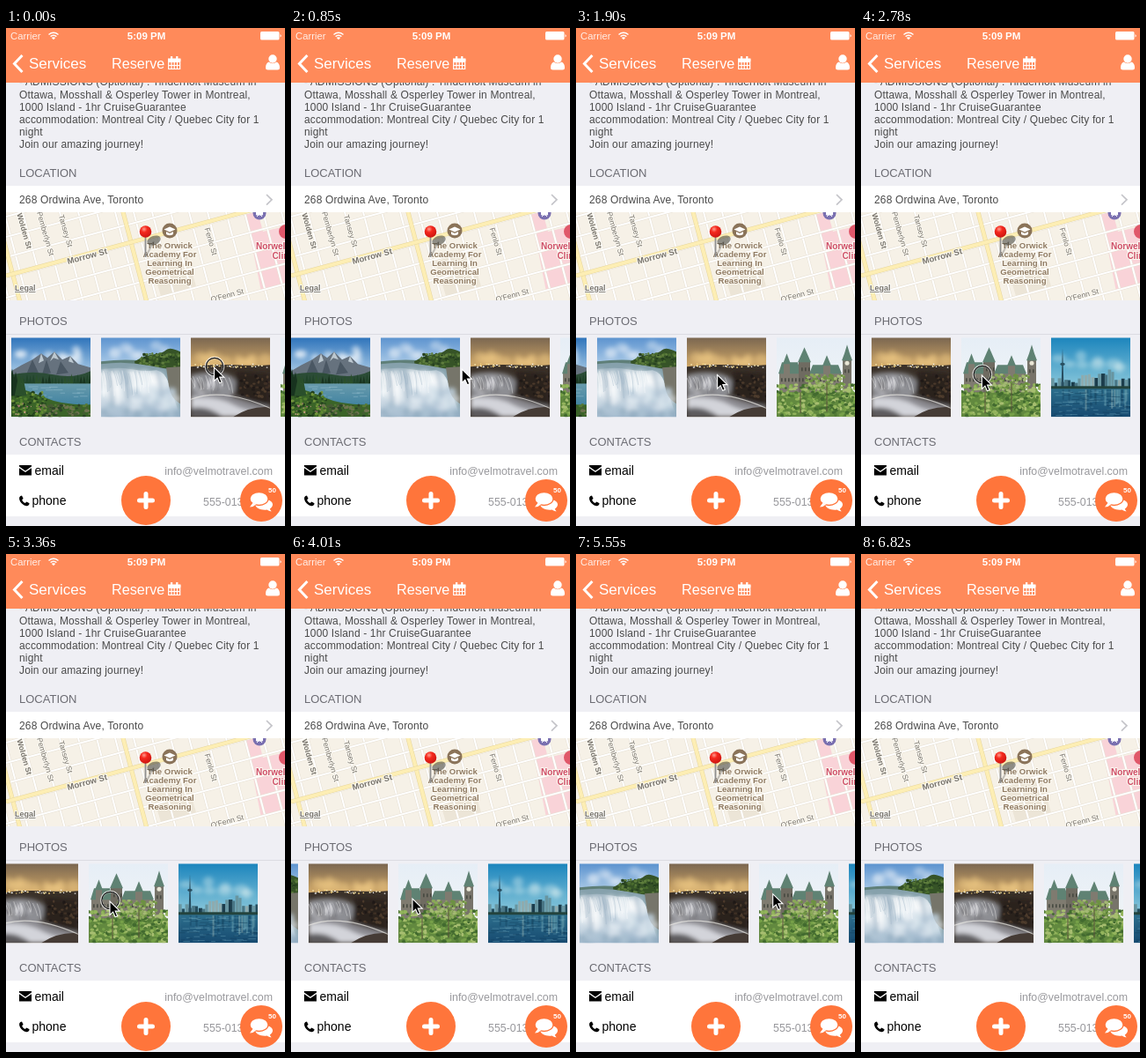
Animation of 317 by 565 pixels, one loop 7100 ms. Source, as an HTML page:

```html
<!DOCTYPE html>
<html lang="en">
<head>
<meta charset="utf-8">
<title>Tour details</title>
<style>
html, body { margin: 0; width: 100%; height: 100%; overflow: hidden; background: #efeff4; }
svg { display: block; width: 100vw; height: 100vh; }
text { font-family: "Liberation Sans", Arial, sans-serif; }
.body { font-size: 12px; letter-spacing: .15px; fill: #4a4a4a; }
.head { font-size: 13px; fill: #6b6b72; }
.side { font-size: 12.4px; fill: #98989c; }
.item { font-size: 14px; fill: #000; }
.map { font-size: 8.6px; fill: #77736c; stroke: #fbf8f0; stroke-width: 2px; paint-order: stroke; }
.nav { fill: #fff; }
</style>
</head>
<body>
<svg viewBox="0 0 317 565" preserveAspectRatio="none">
  <defs>
    <clipPath id="mapClip"><rect y="209" width="317" height="100"/></clipPath>
    <clipPath id="photoClip"><rect width="90" height="90"/></clipPath>
    <filter id="soft" x="-20%" y="-20%" width="140%" height="140%"><feGaussianBlur stdDeviation="2.500"/></filter>
    <radialGradient id="ball" cx=".38" cy=".3" r=".75">
      <stop offset="0" stop-color="#ff9a8c"/><stop offset=".35" stop-color="#f5291d"/><stop offset="1" stop-color="#c81410"/>
    </radialGradient>
    <linearGradient id="sky0" x2="0" y2="1"><stop offset="0" stop-color="#2f74bb"/><stop offset=".5" stop-color="#b5d3ea"/></linearGradient>
    <linearGradient id="sky1" x2="0" y2="1"><stop offset="0" stop-color="#5c93cf"/><stop offset=".4" stop-color="#b9d4ec"/></linearGradient>
    <linearGradient id="sky2" x2="0" y2="1"><stop offset="0" stop-color="#7a6650"/><stop offset=".38" stop-color="#d3aa68"/></linearGradient>
    <linearGradient id="sky3" x2="0" y2="1"><stop offset="0" stop-color="#e6eef6"/><stop offset="1" stop-color="#f4f6f7"/></linearGradient>
    <linearGradient id="sky4" x2="0" y2="1"><stop offset="0" stop-color="#1c85bd"/><stop offset=".65" stop-color="#8fcbdc"/></linearGradient>
    <linearGradient id="lake" x2="0" y2="1"><stop offset="0" stop-color="#6f9fae"/><stop offset="1" stop-color="#3b7f9f"/></linearGradient>
    <linearGradient id="bay" x2="0" y2="1"><stop offset="0" stop-color="#2d6e8c"/><stop offset="1" stop-color="#164a70"/></linearGradient>
    <linearGradient id="fall" x2=".3" y2="1"><stop offset="0" stop-color="#93abb9"/><stop offset=".45" stop-color="#dfe8ee"/><stop offset="1" stop-color="#a3bace"/></linearGradient>
  </defs>

  <rect width="317" height="565" fill="#efeff4"/>

  <g class="body" id="copy"></g>

  <text class="head" x="15" y="169">LOCATION</text>
  <rect y="179" width="317" height="30" fill="#fff"/>
  <text class="body" x="15" y="199">268 Ordwina Ave, Toronto</text>
  <path d="M296 189l6 5.800-6 5.800" fill="none" stroke="#c4c4c9" stroke-width="1.700"/>

  <g clip-path="url(#mapClip)">
    <rect y="209" width="317" height="100" fill="#f6f1e7"/>
    <path d="M272 209h14l6 22 25-6v66l-27 8z" fill="#f9d3d8"/>
    <path d="M164 265l40-12 12 40-40 11z" fill="#ece5d7"/>
    <g id="streets" fill="none"></g>
    <g id="labels" class="map"></g>
    <circle cx="186" cy="230" r="8.500" fill="#8a7359"/>
    <path d="M179.500 228.500l6.500-3 6.500 3-6.500 3zM182 231v3q4 2.500 8 0v-3l-4 2z" fill="#fff"/>
    <circle cx="288" cy="210" r="7.500" fill="#7a70b0"/>
    <path d="M284.500 206h7v6h-7zM285 214l2-2m4 2l-2-2" fill="#fff" stroke="#fff"/>
    <circle cx="318" cy="231" r="8" fill="#e0586a"/>
    <path d="M159 259l9-17" stroke="#444" stroke-opacity=".3" stroke-width="2"/>
    <ellipse cx="168" cy="241" rx="8" ry="5" fill="#4b4b45" opacity=".6" transform="rotate(-22 168 241)"/>
    <path d="M158.500 237v23" stroke="#8f8f8f" stroke-width="1.800"/>
    <circle cx="158.500" cy="231" r="6.800" fill="url(#ball)"/>
    <text x="10" y="298" style="font-size:9px;font-weight:bold;fill:#77736b;stroke:#fff;stroke-width:1.500px;paint-order:stroke;text-decoration:underline">Legal</text>
  </g>

  <text class="head" x="15" y="336.500">PHOTOS</text>
  <path d="M0 347.500h317" stroke="#dcdce2"/>
  <g id="strip"></g>

  <text class="head" x="15" y="474">CONTACTS</text>
  <rect y="484" width="317" height="70" fill="#fff"/>
  <path d="M15 496h14v1.600l-7 4.800-7-4.800zM15 499.200l7 4.800 7-4.800v8.300h-14z"/>
  <text class="item" x="32.500" y="506.600">email</text>
  <text class="side" x="303" y="507" text-anchor="end">info@velmotravel.com</text>
  <path d="M15.300 532.200q1-1.600 2.700-1.700l1.600 3.300-1.500 1.600q1.300 2.600 3.700 3.700l1.700-1.500 3.100 1.700q0 2-1.900 2.600-3.300 1-6.700-2.400-3.700-3.700-2.700-7.300z"/>
  <text class="item" x="29.500" y="541.400">phone</text>
  <text class="side" x="224" y="542">555-013-0199</text>

  <circle cx="159" cy="536" r="28" fill="#ff753b"/>
  <path d="M159 528.500v15M151.500 536h15" stroke="#fff" stroke-width="5" stroke-linecap="round"/>
  <circle cx="290" cy="536" r="24" fill="#ff753b"/>
  <g fill="#fff">
    <path d="M290 534c8 0 13 3 13 6.500 0 2.200-1.300 3.800-3.200 5 .3 1.200 1.100 2 2 2.800-2.200 0-3.800-.7-5.200-1.800-6.300 1-12.800-1.500-13.600-6z"/>
    <ellipse cx="287.500" cy="534" rx="10.500" ry="7.500" stroke="#ff753b" stroke-width="1.300"/>
    <path d="M281 538l-4 5.500q4.200 0 7-3z"/>
    <text x="298" y="527" font-size="8" font-weight="bold">50</text>
  </g>

  <rect width="317" height="62" fill="#ff8a5a"/>
  <g class="nav">
    <text x="5" y="12.600" font-size="11.300" opacity=".85">Carrier</text>
    <path d="M48.500 7.500q5.500-4.600 11 0M50.600 9.600q3.400-2.800 6.800 0" fill="none" stroke="#fff" stroke-width="1.400"/>
    <path d="M51.800 11q2.200-1.600 4.400 0l-2.200 2.200z"/>
    <text x="159.500" y="12.600" font-size="11.500" font-weight="bold" text-anchor="middle">5:09 PM</text>
    <rect x="289" y="4" width="21.500" height="9.500" rx="1.500"/>
    <path d="M311.500 7q2.500 1.800 0 3.600z"/>
    <path d="M18.500 31l-9 9.500 9 9.500" fill="none" stroke="#fff" stroke-width="3"/>
    <text x="26" y="46" font-size="17">Services</text>
    <text x="120" y="46" font-size="16.200">Reserve</text>
    <path d="M184.700 35.500h13v11h-13zM184.700 38.500h13M184.700 42.500h13M188 38v8M191.200 38v8M194.500 38v8" fill="none" stroke="#fff" stroke-width="1.200"/>
    <path d="M184 34.500h14.400v3.500h-14.400zM187 32h2.200v4h-2.200zM193.200 32h2.200v4h-2.200z"/>
    <circle cx="303" cy="35" r="4.700"/>
    <path d="M298.500 38.500q4.500 3.500 9 0 3.500 1.500 3.500 6.500 0 2.500-2.500 2.500h-11q-2.500 0-2.500-2.500 0-5 3.500-6.500z"/>
  </g>

  <g id="pointer">
    <g id="ring" fill="none">
      <circle cx=".5" cy="-1" r="10" stroke="#fff" stroke-opacity=".75" stroke-width="2.600"/>
      <circle cx=".5" cy="-1" r="9.700" stroke="#111" stroke-width="1.200"/>
    </g>
    <path d="M0 0v15.500l3.600-3.400 2.500 5.700 2.600-1.100-2.500-5.600h5z" fill="#000" stroke="#fff" stroke-width="1.100"/>
  </g>
</svg>
<script>
const $ = id => document.getElementById(id);
const LOOP = 7100;

let seed = 11;
const rnd = (a, b) => {
  seed = (seed * 16807) % 2147483647;
  return a + (b - a) * seed / 2147483647;
};
const repeat = (n, make) => Array.from({ length: n }, (_, i) => make(i)).join('');
const pick = list => list[Math.floor(rnd(0, list.length))];

const rect = (x, y, w, h, fill) => `<rect x="${x}" y="${y}" width="${w}" height="${h}" fill="${fill}"/>`;
const shape = (d, fill) => `<path d="${d}" fill="${fill}"/>`;
const line = (d, color, w, o = 1) => `<path d="${d}" fill="none" stroke="${color}" stroke-width="${w}" opacity="${o}"/>`;
const soft = parts => `<g filter="url(#soft)">${parts}</g>`;

// Scattered blots for leaves, foam and lights
const blots = (n, x0, y0, x1, y1, size, colors, o = 1) => repeat(n, () =>
  `<ellipse cx="${rnd(x0, x1)}" cy="${rnd(y0, y1)}" rx="${rnd(.5, 1) * size}" ry="${rnd(.4, .8) * size}" fill="${pick(colors)}" opacity="${o}"/>`);
const ripples = (n, y0, y1, color, o) => repeat(n, () =>
  line(`M${rnd(0, 85)} ${rnd(y0, y1)}h${rnd(3, 13)}`, color, .8, o));

const pine = (x, y, h) => shape(`M${x} ${y - h}l${h * .2} ${h}h${-h * .4}z`, pick(['#18331f', '#20432a', '#2a4f2b']));

function lakePhoto() {
  return rect(0, 0, 90, 90, 'url(#sky0)') +
    soft(blots(10, 10, 14, 90, 26, 8, ['#fff'], .5)) +
    shape('M0 38L12 31 24 25 34 18 41 23 49 16 58 25 67 21 76 30 90 34V50H0z', '#66727e') +
    shape('M34 18l3 8-6 3zM49 16l5 9-6-2-4 4zM67 21l4 8-6-2z', '#bcc8d0') +
    shape('M24 25l7 15-14 2zM56 27l9 13-14 2zM40 25l5 15-10 2z', '#4a5763') +
    rect(0, 48, 90, 33, 'url(#lake)') +
    shape('M0 42q25-5 48 0t42-4v14H0z', '#2b4c36') +
    repeat(26, i => pine(i * 3.6, 52, rnd(6, 11))) +
    ripples(22, 54, 72, '#c9e0e8', .35) +
    shape('M0 56q18 3 38 12t52 8v14H0z', '#3b6428') +
    blots(110, 0, 62, 40, 90, 2.4, ['#55822f', '#2c5223', '#74953c', '#223f1d']) +
    blots(70, 35, 76, 90, 90, 2.4, ['#465b34', '#6f7350', '#2d4328', '#577a36']) +
    blots(18, 2, 73, 34, 88, 1.1, ['#c3718a', '#d7a18f']) +
    repeat(4, i => pine(1 + i * 4, 66, rnd(22, 32)));
}

function fallsPhoto() {
  return rect(0, 0, 90, 90, 'url(#sky1)') +
    soft(blots(10, 0, 8, 80, 22, 8, ['#e8f0f8'], .4)) +
    shape('M0 27q25-3 45-1t45-2v12H0z', '#5f7f78') +
    shape('M38 27q12-7 22-8t14-5 16 2v24H40z', '#365327') +
    blots(80, 44, 18, 90, 33, 2.2, ['#496b2e', '#26401f', '#5e7d3d']) +
    shape('M0 30q28-4 56 2t34 2v56H0z', '#86a1ac') +
    shape('M0 36q22-3 35 0t28 1q10 2 14 15l13 38H0z', 'url(#fall)') +
    shape('M74 34l16-1v42q-11-6-13-20z', '#76756a') +
    soft(repeat(18, i => line(`M${i * 4} ${36 + rnd(0, 5)}q4 14 ${rnd(3, 8)} ${rnd(22, 42)}`,
        pick(['#fff', '#9fb4c5', '#e6eef3']), 4, .8)) +
      blots(28, 30, 58, 90, 84, 8, ['#cfdde8', '#e9f0f5', '#b0c5d6'], .6) +
      blots(16, 0, 78, 90, 92, 7, ['#8faabd', '#a9c0d2'], .7)) +
    repeat(24, i => line(`M${i * 2.4} ${37 + rnd(0, 4)}q3 10 ${rnd(1, 5)} ${rnd(12, 30)}`,
      pick(['#fff', '#9db5c6']), .8, .5));
}

function nightPhoto() {
  return rect(0, 0, 90, 90, 'url(#sky2)') +
    soft(blots(12, 10, 20, 85, 32, 9, ['#f0c984'], .45)) +
    shape('M0 33q24-3 50-2t40 0v59H0z', '#3a3129') +
    blots(40, 2, 30, 89, 34, 1.2, ['#fff2bd', '#ffdc83', '#fff']) +
    soft(shape('M0 42q20-5 38-1 14 3 14 14t-16 14-36 6z', '#8d8e93') +
      shape('M52 38l38 3v36q-26-4-40-14z', '#2a211c') +
      blots(14, 0, 44, 40, 62, 5, ['#c9cad0', '#6e6c6d', '#e6e6ea'], .7) +
      shape('M0 66q30-6 52 2t38 10v12H0z', '#8b8a90') +
      shape('M0 68q30-2 48 8t42 8v6H0z', '#d3d4da') +
      shape('M0 80q20-4 36 10H0z', '#5d5b5f')) +
    repeat(20, i => line(`M${i * 2.4} ${42 + rnd(0, 4)}q4 8 ${rnd(1, 6)} ${rnd(10, 20)}`,
      pick(['#eee', '#77777d']), .8, .5)) +
    blots(50, 55, 42, 90, 68, 2.4, ['#463529', '#1d1816', '#5a4532'], .7) +
    shape('M48 90q20-13 42-11v11z', '#453b35') +
    line('M0 70Q36 56 90 80', '#f0eee9', 1.2, .7);
}

function hallPhoto() {
  const roof = '#5f8273', wall = '#7f7b70';
  const windows = (x, y, n) => repeat(n, i => rect(x + i * 4, y, 1.6, 4, '#474941'));
  return rect(0, 0, 90, 90, 'url(#sky3)') +
    rect(3, 40, 70, 30, wall) +
    shape('M2 41l4-13h18l4 13zM37 41l4-10h29l4 10z', roof) +
    rect(25, 27, 13, 40, '#6f6b61') + shape('M24 28l7.500-17 7.500 17z', roof) +
    rect(8, 29, 7, 18, wall) + shape('M7 30l4.500-12 4.500 12z', roof) +
    rect(53, 31, 8, 22, wall) + shape('M52 32l5-12 5 12z', roof) +
    rect(75, 25, 10, 45, '#77746a') + shape('M74 26l3-8 3-10 3 10 3 8z', roof) +
    `<circle cx="80" cy="29" r="2.500" fill="#e8e5d5"/>` +
    windows(5, 46, 17) + windows(28, 34, 3) + windows(77, 36, 2) +
    rect(0, 62, 90, 28, '#62893f') +
    blots(330, 0, 53, 90, 89, 2.8, ['#76a048', '#93b45c', '#527a36', '#a7be70', '#426a2f']) +
    blots(90, 33, 42, 78, 62, 2.4, ['#8aa958', '#6d9142', '#a3b873']) +
    line('M57 84V52m-30 34V62', '#58503b', 1);
}

function skylinePhoto() {
  const towers = repeat(24, i => {
    const h = rnd(6, 13) + (i > 7 && i < 20 ? rnd(2, 11) : 0), x = i * 3.8;
    return rect(x, 58 - h, rnd(3, 4.6), h, pick(['#244d5e', '#497584', '#6895a0', '#1c3d4c', '#8eabae']));
  });
  return rect(0, 0, 90, 90, 'url(#sky4)') +
    soft(blots(9, 0, 20, 90, 40, 9, ['#d5ecee'], .4)) + towers +
    shape('M11.500 58l1-34 .5-12 .5 12 1 34z', '#284e60') +
    `<ellipse cx="13" cy="30" rx="2.800" ry="1.600" fill="#284e60"/>` +
    rect(0, 55, 90, 4, '#23433d') +
    rect(0, 58, 90, 32, 'url(#bay)') +
    repeat(20, () => line(`M${rnd(2, 88)} 59v${rnd(6, 24)}`, pick(['#88b9bf', '#103a56', '#bdd0c4']), 2, .35)) +
    ripples(65, 60, 89, '#82bbca', .4) + ripples(35, 62, 89, '#0d3552', .5);
}

const PITCH = 102;
$('strip').innerHTML = [lakePhoto, fallsPhoto, nightPhoto, hallPhoto, skylinePhoto]
  .map((paint, i) => `<g transform="translate(${i * PITCH} 0)"><g clip-path="url(#photoClip)">${paint()}</g></g>`).join('');

$('copy').innerHTML = [
  '- ADMISSIONS (Optional) : Tinderholt Museum in',
  'Ottawa, Mosshall &amp; Osperley Tower in Montreal,',
  '1000 Island - 1hr CruiseGuarantee',
  'accommodation: Montreal City / Quebec City for 1',
  'night',
  'Join our amazing journey!'
].map((s, i) => `<text x="15" y="${65.4 + i * 14.2}">${s}</text>`).join('');

// Streets: "across" rises to the right, "down" leans to the right
const across = y => `M0 ${y}l330 -88`;
const down = x => `M${x} 205l29 110`;
const road = (d, w, fill, edge) => line(d, edge, w + 1) + line(d, fill, w);
$('streets').innerHTML =
  repeat(18, i => road(down(-45 + i * 21), 2, '#fff', '#e6dfd2')) +
  repeat(9, i => road(across(214 + i * 23), 2, '#fff', '#e6dfd2')) +
  [down(-12), down(132), across(281)].map(d => road(d, 4, '#fdeeb4', '#e6d59c')).join('');

const label = (s, x, y, turn = 0, style = '') =>
  `<text transform="translate(${x} ${y}) rotate(${turn})" text-anchor="middle" style="${style}">${s}</text>`;
const bold = 'font-weight:bold;';
const brown = bold + 'fill:#8f7a62;font-size:9.600px';
const pink = bold + 'fill:#cf4d67;font-size:10px';
$('labels').innerHTML =
  label('Wolden St', 18, 231, 74, bold) +
  label('Pemberlyn St', 42, 234, 74) +
  label('Tansey St', 65, 231, 74) +
  label('Morrow St', 93, 262, -15, bold + 'font-size:9.500px') +
  label('Fenlo St', 230, 243, 74) +
  label("O'Fenn St", 252, 306, -15) +
  ['The Orwick', 'Academy For', 'Learning In', 'Geometrical', 'Reasoning']
    .map((s, i) => label(s, 186, 250 + i * 10, 0, brown)).join('') +
  label('Norwell', 302, 251, 0, pink) + label('Clinic', 316, 262, 0, pink);

// Keys are [time, value]; each span eases out
const scrollKeys = [[50, 6], [390, 32], [630, 32], [850, 0], [1370, 0], [1550, -78], [1900, -78],
  [2610, -130], [2670, -130], [2780, -192], [3000, -210], [3300, -210], [3360, -212], [3600, -212],
  [4010, -184], [4960, -184], [5310, -98]];
const xKeys = [[50, 236.5], [390, 263], [630, 263], [850, 194], [1310, 239], [1370, 239], [1550, 160.5],
  [1900, 160.5], [2610, 200], [2670, 200], [2780, 137.5], [3000, 120], [3300, 120], [3360, 118], [3600, 118],
  [4010, 138], [4960, 138], [5310, 223.5], [5550, 223.5], [5790, 248], [6210, 248], [6820, 330]];
const yKeys = [[50, 385], [630, 385], [850, 387], [1370, 387], [1550, 393], [2610, 394], [3600, 394],
  [4010, 391], [4960, 391], [5310, 385.5], [5550, 385.5], [5790, 412], [6210, 412], [6820, 166]];
const presses = [[0, 630], [1370, 1900], [2670, 3600], [4390, 5550]];

function at(keys, t) {
  const i = keys.findIndex(k => k[0] > t);
  if (i < 0) return keys[keys.length - 1][1];
  if (i === 0) return keys[0][1];
  const [t0, a] = keys[i - 1], [t1, b] = keys[i];
  const p = (t - t0) / (t1 - t0);
  return a + (b - a) * p * (2 - p);
}

function draw(t) {
  $('strip').setAttribute('transform', `translate(${Math.round(at(scrollKeys, t))} 351.300)`);
  $('pointer').setAttribute('transform', `translate(${at(xKeys, t)} ${at(yKeys, t)})`);
  $('ring').setAttribute('visibility', presses.some(([a, b]) => t >= a && t < b) ? 'visible' : 'hidden');
}

const start = performance.now();
function tick() {
  draw((performance.now() - start) % LOOP);
  requestAnimationFrame(tick);
}
tick();
</script>
</body>
</html>
```
